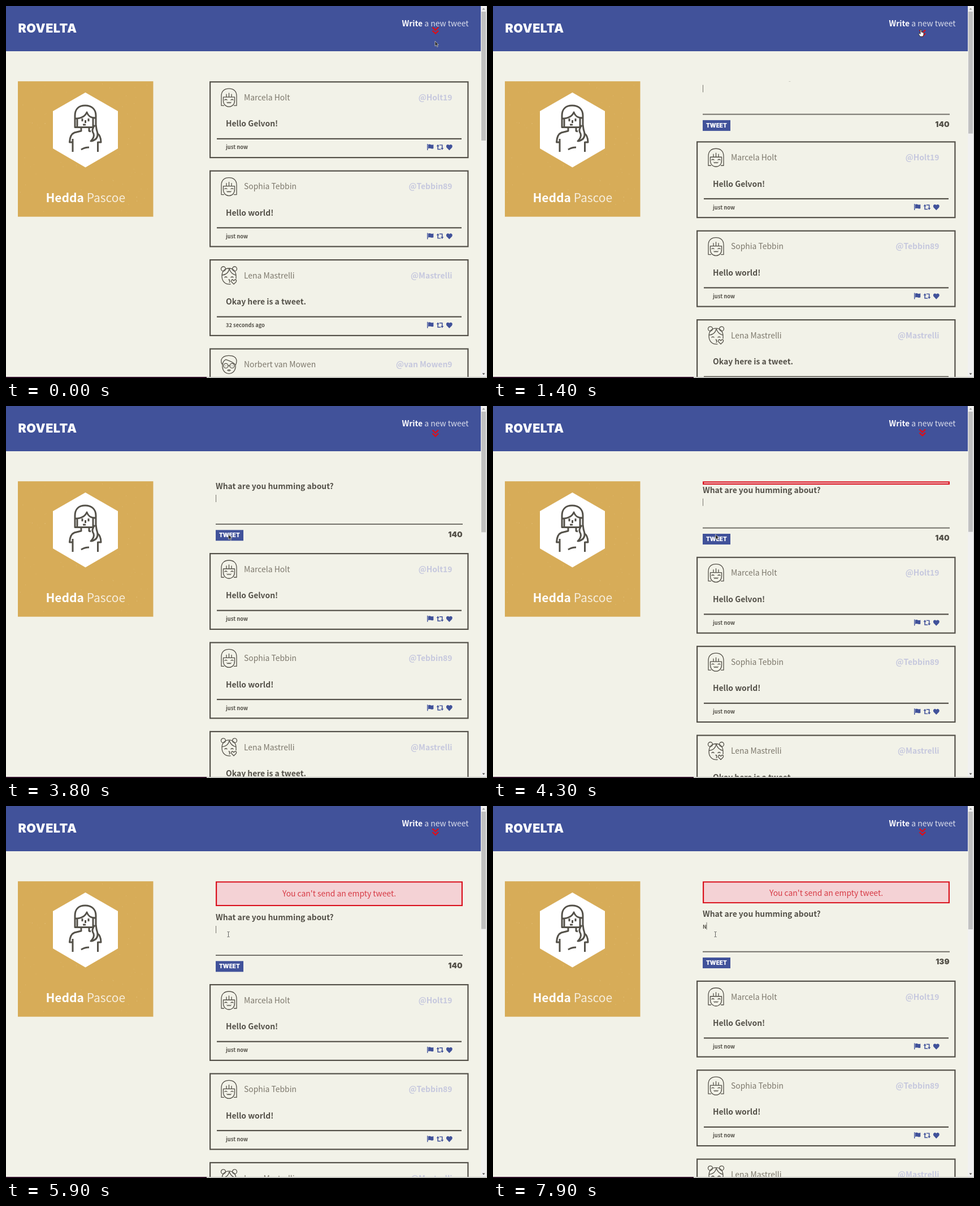
An HTML page for the animation above (8 s loop, 851 px wide and 658 px high).

```html
<!DOCTYPE html>
<html lang="en">
<head>
<meta charset="utf-8">
<title>Feed</title>
<style>
html, body { margin: 0; width: 100%; height: 100%; overflow: hidden; background: #f2f2e8; }
svg { display: block; }
text { font: 300 13.9px "Noto Sans CJK JP", "Noto Sans CJK SC", "Noto Sans CJK", "Open Sans", sans-serif; fill: #545149; white-space: pre; }
.bold { font-weight: 600; }
.thin { fill-opacity: .8; }
.name { fill: #7d786c; }
.handle { font-weight: 600; fill: #c6c8de; text-anchor: end; }
.small { font-weight: 600; font-size: 9.3px; }
.profile { font-size: 21px; fill: #fff; text-anchor: middle; }
.white { fill: #fff; }
.end { text-anchor: end; }
.heavy { font-family: Inter, "Open Sans", sans-serif; font-weight: 900; }
.line { fill: none; stroke: #545149; stroke-width: 1.3; stroke-linecap: round; stroke-linejoin: round; }
</style>
</head>
<body>
<svg id="stage" width="851" height="658" viewBox="0 0 851 658">
  <defs>
    <clipPath id="formClip"><rect id="formWindow" x="360" y="133" width="470" height="0"/></clipPath>
    <g id="fringe" class="line">
      <path d="M1 31V14C1 5 7 1 14.500 1S28 5 28 14V31H23.500M1 31H5.500M4.500 16V22C4.500 29 9 33 14.500 33S24.500 29 24.500 22V16M4.500 16H24.500M10 16V11M14.500 16V9M19 16V11"/>
      <path d="M7 21q2-2 4 0M18 21q2-2 4 0M11 25q1.800 2.600 3.500 0q1.800 2.600 3.500 0"/>
    </g>
    <g id="buns" class="line">
      <circle cx="4.500" cy="5" r="4"/><circle cx="24.500" cy="5" r="4"/>
      <path d="M17 32C8 33 2 27 2 18C2 9 7 4 14.500 4S27 9 27 18V22M2.500 16Q13 15 15 5Q18 14 26.500 16M7 20q2-2 4 0M18 20q2-2 4 0M14 24q3 0 1 2q3 1 0 3"/>
      <path d="M23 32l-4-4q-1-4 2-4l2 2l2-2q4 0 2 4z"/>
    </g>
    <g id="glasses" class="line">
      <path d="M3 17Q0 14 1 8Q4 1 14 1Q27 1 28 10Q28 15 26 18M3 17Q4 10 9 8Q21 12 26 17M3 17V22C4 29 9 33 14.500 33S25 29 26 22V17"/>
      <circle cx="9" cy="19" r="4"/><circle cx="20" cy="19" r="4"/>
      <path d="M13 19h3M9 19v.1M20 19v.1M12 27q2.500-2 5 0q-2.500 2-5 0"/>
    </g>
    <g id="actions" fill="#41529a">
      <path d="M745 110.800h1.400v11H745zM747 111.800q2.500-1 4.800 .2q2 .7 4.500-.3v7q-2.500 1-4.800 .1q-2-.9-4.500 .2z"/>
      <path d="M761.500 115l2.600-3.400l2.600 3.400h-1.800v4.600h3.600l1.200 1.400h-6.400V115zM766.200 112h6.300v6h1.800l-2.600 3.400l-2.600-3.400h1.800v-4.600h-3.600z"/>
      <path d="M784.300 122l-4.700-4.800q-1.700-2.900 .4-4.900q2.500-1.500 4.300 .8q1.800-2.300 4.300-.8q2.100 2 .4 4.900z"/>
    </g>
  </defs>
  <rect width="851" height="658" fill="#f2f2e8"/>

  <rect x="21" y="133.200" width="239.500" height="239.500" fill="#d7ac58"/>
  <g id="specks" fill="#e6c582"></g>
  <path d="M140.500 153L198 186V252L140.500 285.500L83 252V186z" fill="#fff"/>
  <g class="line" style="stroke-width:3;stroke-linecap:butt">
    <path d="M122 215V194C122 182 129 176 140 176S159 182 159 194V213M122 199C133 199 140 195 143 188C146 196 151 198 158 198M126 199V214.500H154V198M121 214.500H128"/>
    <path d="M135 199v5M146 199v5M140.500 202v5M136 210h5"/>
    <path d="M133 215V221L121 224C116 226 113 231 112.500 241H119M118 235V258M147 215V221L150 222M161 225C166 228 168 233 168 241H162M162.500 240V258M133 254Q139 250 147 250"/>
    <path d="M157 211Q150 219 155 226Q157 232 150 239Q163 237 162 225Q160 219 159 211"/>
  </g>
  <text class="profile" x="140.800" y="346.500"><tspan class="bold">Hedda</tspan><tspan class="thin"> Pascoe</tspan></text>

  <g clip-path="url(#formClip)" id="formOuter">
    <g id="form">
      <text class="bold" x="371" y="147">What are you humming about?</text>
      <text id="typed" class="small" x="371" y="168.500">N</text>
      <rect id="caret" x="371" y="157" width="1" height="13" fill="#77756e"/>
      <rect x="371" y="208" width="437" height="2" fill="#74726b"/>
      <rect x="371" y="219.300" width="49" height="19" fill="#41529a"/>
      <text class="heavy white" x="377" y="232.300" style="font-size:10px">TWEET</text>
      <text id="count" class="heavy end" x="807.500" y="231.500" style="font-size:13.500px">140</text>
    </g>
  </g>

  <svg id="alert" x="371" y="133.200" width="437" height="44">
    <rect width="437" height="44" fill="#f4d2d5"/>
    <text id="alertText" class="thin" x="218.500" y="27" text-anchor="middle" style="fill:#d01522">You can't send an empty tweet.</text>
    <rect id="alertBorder" x="1.100" y="1.100" width="434.800" height="42" fill="none" stroke="#d9101c" stroke-width="2.200"/>
  </svg>

  <g id="feed"></g>

  <rect width="840" height="80" fill="#41529a"/>
  <text class="heavy white" x="21.500" y="47.300" style="font-size:21.500px;letter-spacing:.5px">ROVELTA</text>
  <text class="white end" x="818.500" y="36"><tspan class="bold">Write</tspan><tspan class="thin"> a new tweet</tspan></text>
  <path id="chevrons" d="M754.500 42.500l5.300 5l5.300-5m-10.600 6l5.300 5l5.300-5" fill="none" stroke="#d9101c" stroke-width="2.400"/>

  <rect x="840" width="11" height="656" fill="#f1f1f1"/>
  <rect x="850" width="1" height="656" fill="#c9c9c6"/>
  <rect id="thumb" x="841" y="10" width="8" height="228" fill="#c1c1c1"/>
  <path d="M842.500 6.500l2.500-3l2.500 3z" fill="#999"/>
  <path d="M842.500 649.500l2.500 3l2.500-3z" fill="#555"/>
  <rect y="656" width="851" height="2" fill="#c2c2be"/>
  <rect y="656" width="355" height="2" fill="#2b0d25"/>

  <g id="cursor">
    <path id="arrow" d="M0 0V9L2.200 7.200L3.800 10.500L5.200 9.800L3.700 6.600H6.300z" fill="#2c2c2c" stroke="#d8d8d8" stroke-width=".7"/>
    <path id="hand" d="M-1 0Q0-1 1 0V4L5 5V9L3.500 12H-1.500L-4 7.500Q-4 6-2.500 6.500L-1 7.500z" fill="#fff" stroke="#222" stroke-width=".9"/>
    <path id="beam" d="M-2-4.500H-.5L0-4L.5-4.500H2M0-4V4M-2 4.500H-.5L0 4L.5 4.500H2" fill="none" stroke="#555" stroke-width=".9"/>
  </g>
</svg>
<script>
const LOOP = 8000, STEP = 100, TOP = 133.2, PITCH = 157.4, FORM = 126.8;
const $ = id => document.getElementById(id);
const set = (id, attrs) => {
  for (const key in attrs) $(id).setAttribute(key, attrs[key]);
};
const show = (id, on) => { $(id).style.display = on ? '' : 'none'; };

const posts = [
  ['fringe', 'Marcela Holt', '@Holt19', 'Hello Gelvon!', 'just now'],
  ['fringe', 'Sophia Tebbin', '@Tebbin89', 'Hello world!', 'just now'],
  ['buns', 'Lena Mastrelli', '@Mastrelli', 'Okay here is a tweet.', '32 seconds ago'],
  ['glasses', 'Norbert van Mowen', '@van Mowen9', 'Good morning!', '1 minute ago']
];
$('feed').innerHTML = posts.map(([face, name, handle, body, age]) => `<g>
  <rect x="361.100" y="1.100" width="456.300" height="133.800" fill="#f2f2e8" stroke="#545149" stroke-width="2.200"/>
  <use href="#${face}" x="380" y="12"/>
  <text class="name" x="421" y="33.800">${name}</text>
  <text class="handle" x="789.500" y="33.800">${handle}</text>
  <text class="bold" x="389" y="80.300">${body}</text>
  <rect x="373" y="100.600" width="433" height="2.200" fill="#545149"/>
  <text class="small" x="389" y="120.300">${age}</text>
  <use href="#actions"/></g>`).join('');
const cards = [...$('feed').children];

let seed = 7;
const random = () => (seed = seed * 16807 % 2147483647) / 2147483647;
$('specks').innerHTML = Array.from({ length: 170 }, () =>
  `<circle cx="${22 + random() * 237}" cy="${134 + random() * 237}" r="${.3 + random() * .5}" opacity="${.2 + random() * .5}"/>`).join('');

const clamp = x => Math.min(1, Math.max(0, x));
const swing = (t, start) => .5 - .5 * Math.cos(Math.PI * clamp((t - start) / 400));

// CSS "ease" curve, solved by bisection
function ease(x) {
  let lo = 0, hi = 1;
  for (let i = 0; i < 20; i++) {
    const s = (lo + hi) / 2;
    if (.75 * s * (1 - s) + s ** 3 < x) lo = s; else hi = s;
  }
  return .3 * lo * (1 - lo) ** 2 + 3 * lo * lo * (1 - lo) + lo ** 3;
}

// Rows of [time, ...values]
function track(rows, t, curve = x => x) {
  const i = rows.findIndex(row => row[0] > t);
  if (i < 0) return rows[rows.length - 1].slice(1);
  if (!i) return rows[0].slice(1);
  const a = rows[i - 1], b = rows[i];
  const k = curve((t - a[0]) / (b[0] - a[0]));
  return a.slice(1).map((v, j) => v + (b[j + 1] - v) * k);
}

const bounce = [[0, 0], [400, 0], [800, -6], [1000, 0], [1200, -3], [1600, 0], [2000, 0]];
const pointer = [[0, 759, 62], [100, 759, 61], [800, 757, 42], [1500, 757, 42],
  [2200, 389, 202], [2300, 389, 204], [2700, 391, 218], [3000, 393.5, 227]];
const caretOn = [[1100, 1700], [2300, 2900], [3500, 4100], [4200, 4800],
  [5400, 6000], [6600, 7200], [7800, LOOP]];

function draw(t) {
  const open = FORM * swing(t, 1106);
  const alertShown = t > 4241;
  const alertOpen = swing(t, 4241) - swing(t, 7809);
  const alertSpace = alertShown ? 4 + 51 * alertOpen : 0;
  const offset = open + alertSpace;

  set('formWindow', { height: open });
  set('formOuter', { transform: `translate(0 ${alertSpace})` });
  set('form', { transform: `translate(0 ${(open - FORM) * .84})` });

  show('alert', alertShown);
  const alertHeight = 4 + 40 * alertOpen;
  set('alert', { height: alertHeight });
  set('alertBorder', { height: alertHeight - 2.2 });
  set('alertText', { y: 27 - 10 * (1 - alertOpen) });

  const typed = t >= 7800;
  show('typed', typed);
  $('count').textContent = typed ? '139' : '140';
  set('caret', { x: typed ? 377.5 : 371 });
  show('caret', caretOn.some(([from, to]) => t >= from && t < to));

  cards.forEach((card, i) =>
    card.setAttribute('transform', `translate(0 ${TOP + offset + i * PITCH})`));
  set('thumb', { height: 638 * 658 / (1841 + offset) });
  set('chevrons', { transform: `translate(0 ${track(bounce, (t + 600) % 2000, ease)[0]})` });

  const [x, y] = track(pointer, t);
  const inField = y - TOP - alertSpace;
  const kind = x > 700 && y < 56 ? 'hand'
    : open > 100 && x > 371 && x < 808 && inField > 22 && inField < 77 ? 'beam' : 'arrow';
  for (const id of ['arrow', 'hand', 'beam']) show(id, id === kind);
  set('cursor', { transform: `translate(${x} ${y})` });
}

function tick() {
  draw(Math.floor(performance.now() % LOOP / STEP) * STEP);
  requestAnimationFrame(tick);
}
tick();
</script>
</body>
</html>
```
